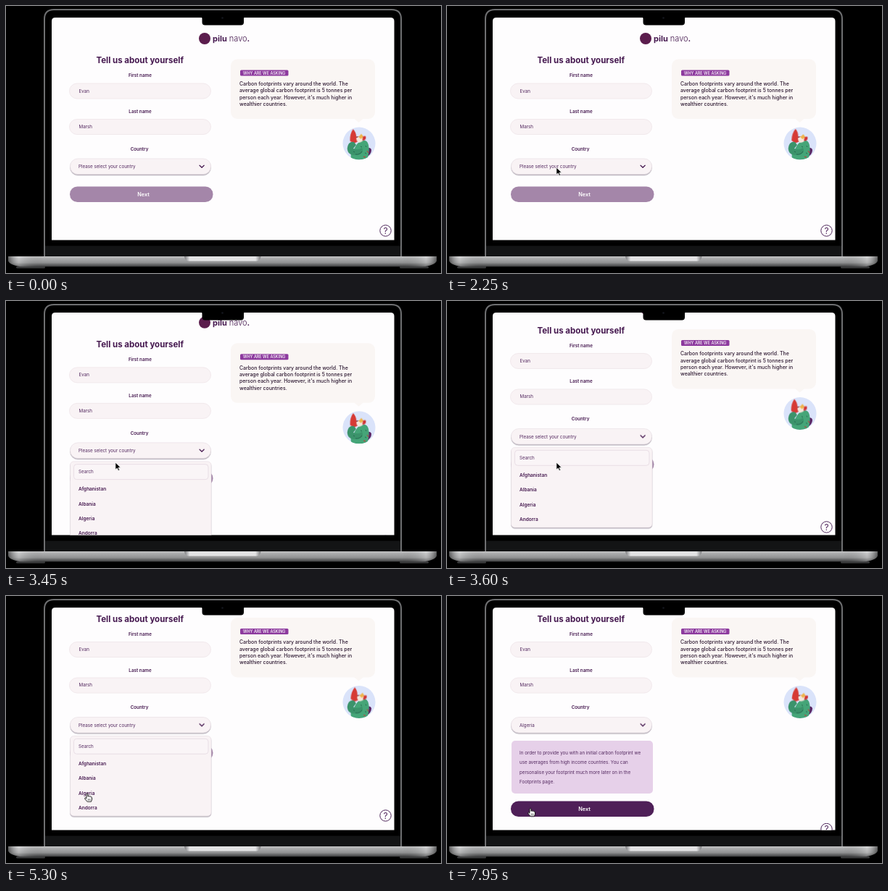
Animation, 600 px wide and 369 px high, one loop 8 s. Source, as an HTML page:

```html
<!DOCTYPE html>
<html lang="en">
<head>
<meta charset="utf-8">
<title>Tell us about yourself</title>
<style>
  html, body { margin: 0; width: 100%; height: 100%; overflow: hidden; background: #000; }
  svg { display: block; width: 100vw; height: 100vh; }
  text { font: 400 6.25px Inter, sans-serif; fill: #53285f; }
  .title { font-size: 11.5px; font-weight: 700; fill: #45184f; }
  .label { font-size: 6.3px; font-weight: 600; fill: #45184f; }
  .item { font-size: 6.5px; font-weight: 600; fill: #45184f; }
  .copy { font-size: 6.95px; font-weight: 500; fill: #29152e; }
  .tag { font-size: 5.5px; font-weight: 500; fill: #fff; }
  .next { font-size: 7.3px; font-weight: 600; fill: #fff; }
  .brand { font-size: 11px; font-weight: 300; fill: #45184f; }
  .brand tspan { font-weight: 700; }
  .mark { font-size: 12px; }
  .mid { text-anchor: middle; }
  .field { fill: #f9f3f5; stroke: #efe5e9; stroke-width: .8; }
  .raised { fill: #f9f3f5; stroke: #e6dce2; stroke-width: .6; filter: url(#drop); }

  .anim { animation: 8s linear infinite; }
  .page { animation-name: scroll; }
  .pointer { animation-name: move; }
  .head { animation: nod 1.6s ease-in-out infinite alternate; transform-origin: 485px 195px; }
  .step { animation: 8s step-end infinite; }
  .menu { animation-name: menu; }
  .before { animation-name: before; }
  .after { animation-name: after; }
  .help { animation-name: help; }
  .arrow { animation-name: arrow; }
  .hand { animation-name: hand; }

  @keyframes scroll {
    0%, 41.875% { transform: translateY(0); }
    43.125% { transform: translateY(-15px); }
    45% { transform: translateY(-34.5px); }
    47.5%, 100% { transform: translateY(-43.5px); }
  }
  @keyframes move {
    0%, 13.75% { transform: translate(160px, 376px); animation-timing-function: ease-out; }
    18.125%, 20% { transform: translate(157.5px, 288px); animation-timing-function: ease-in-out; }
    24.375%, 48.75% { transform: translate(150.8px, 223px); animation-timing-function: ease-in-out; }
    57.5%, 86.875% { transform: translate(111px, 272.2px); animation-timing-function: ease-in-out; }
    93.125%, 100% { transform: translate(114px, 292.5px); }
  }
  @keyframes nod { from { transform: rotate(-3deg); } to { transform: rotate(4deg); } }
  @keyframes menu { 0% { opacity: 0; } 30% { opacity: 1; } 73.75%, 100% { opacity: 0; } }
  @keyframes before { 0% { opacity: 1; } 73.75%, 100% { opacity: 0; } }
  @keyframes after { 0% { opacity: 0; } 73.75%, 100% { opacity: 1; } }
  /* The help button sits at the page bottom, so it follows the page height. */
  @keyframes help {
    0% { transform: none; }
    30% { transform: translateY(36.5px); }
    73.75%, 100% { transform: translateY(55px); }
  }
  @keyframes arrow {
    0% { opacity: 1; } 53.75% { opacity: 0; } 73.75% { opacity: 1; } 90.625%, 100% { opacity: 0; }
  }
  @keyframes hand {
    0% { opacity: 0; } 53.75% { opacity: 1; } 73.75% { opacity: 0; } 90.625%, 100% { opacity: 1; }
  }
</style>
</head>
<body>
<svg viewBox="0 0 600 369">
  <defs>
    <clipPath id="screen"><path d="M63 323.5V21q0-5 5-5H530.5q5 0 5 5V323.5Z"/></clipPath>
    <clipPath id="portrait"><circle cx="487" cy="190" r="22.5"/></clipPath>
    <linearGradient id="metal" x2="0" y2="1">
      <stop offset="0" stop-color="#d0d0d1"/>
      <stop offset=".2" stop-color="#b4b5b6"/>
      <stop offset=".6" stop-color="#999a9b"/>
      <stop offset="1" stop-color="#3c3d3e"/>
    </linearGradient>
    <linearGradient id="edges">
      <stop offset="0" stop-color="#000" stop-opacity=".5"/>
      <stop offset=".025" stop-color="#fff" stop-opacity=".25"/>
      <stop offset=".08" stop-color="#000" stop-opacity=".05"/>
      <stop offset=".92" stop-color="#000" stop-opacity=".05"/>
      <stop offset=".975" stop-color="#fff" stop-opacity=".25"/>
      <stop offset="1" stop-color="#000" stop-opacity=".5"/>
    </linearGradient>
    <linearGradient id="lip">
      <stop offset="0" stop-color="#77787a"/>
      <stop offset=".07" stop-color="#e2e2e3"/>
      <stop offset=".93" stop-color="#e2e2e3"/>
      <stop offset="1" stop-color="#77787a"/>
    </linearGradient>
    <filter id="drop" x="-5%" y="-10%" width="110%" height="130%">
      <feDropShadow dx="0" dy="1.3" stdDeviation=".6" flood-color="#7d6f82" flood-opacity=".6"/>
    </filter>
    <path id="base" d="M3 346H594V352q-3 7-20 8.300H23Q6 359 3 352Z"/>
    <rect id="foot" y="359.5" width="40" height="3" rx="1.5" fill="#3a3b3c"/>
  </defs>

  <rect width="600" height="369"/>

  <!-- Lid -->
  <path d="M53 346V18q0-13 13-13H532q13 0 13 13V346Z" stroke="#6e6f71" stroke-width="2"/>
  <path d="M54 331.500H544V346H54Z" fill="#131415"/>

  <g clip-path="url(#screen)">
    <rect x="63" y="16" width="473" height="308" fill="#fefdfe"/>

    <g class="page anim">
      <circle cx="274" cy="45" r="8" fill="#5b1d4d"/>
      <text class="brand" x="285" y="49"><tspan>pilu</tspan> navo<tspan>.</tspan></text>

      <text class="title mid" x="184.7" y="79.3">Tell us about yourself</text>
      <text class="label mid" x="185" y="98.2">First name</text>
      <rect class="field" x="87.5" y="107" width="195" height="21" rx="10.5"/>
      <text x="100.5" y="119.5">Evan</text>
      <text class="label mid" x="185" y="148">Last name</text>
      <rect class="field" x="87.5" y="156.5" width="195" height="21" rx="10.5"/>
      <text x="100.5" y="168.8">Marsh</text>
      <text class="label mid" x="184" y="199.7">Country</text>

      <g class="before step">
        <rect x="88" y="249.5" width="197.500" height="21.5" rx="10.5" fill="#a486a9"/>
        <text class="next mid" x="189.5" y="262.9">Next</text>
      </g>

      <g class="after step">
        <rect x="89" y="243.5" width="195" height="73" rx="5" fill="#e6d0e9"/>
        <text x="100" y="262.5">In order to provide you with an initial carbon footprint we</text>
        <text x="100" y="275.9">use averages from high income countries. You can</text>
        <text x="100" y="289.2">personalise your footprint much more later on in the</text>
        <text x="100" y="302.6">Footprints page.</text>
        <rect x="88" y="327" width="197.5" height="21.5" rx="10.5" fill="#4f2058"/>
        <text class="next mid" x="189.5" y="340.4">Next</text>
      </g>

      <rect class="raised" x="88.5" y="211" width="194" height="21.5" rx="10.5"/>
      <text class="before step" x="100" y="224.3">Please select your country</text>
      <text class="after step" x="100" y="224.3">Algeria</text>
      <path d="M267 220.300l3.100 3 3.100-3" fill="none" stroke="#45184f" stroke-width="1.25" stroke-linecap="round" stroke-linejoin="round"/>

      <g class="help step">
        <circle cx="523.5" cy="310.5" r="7.7" fill="#fff" stroke="#4b2358"/>
        <text class="mark mid" x="523.5" y="314.8">?</text>
      </g>

      <g class="menu step">
        <rect class="raised" x="88.5" y="237" width="194.5" height="110.5" rx="5"/>
        <rect x="93.5" y="240.8" width="185.5" height="21" rx="4" fill="#faf5f7" stroke="#e5d9e1" stroke-width=".8"/>
        <text x="100" y="253.5">Search</text>
        <text class="item" x="100" y="277.5">Afghanistan</text>
        <text class="item" x="100" y="297.8">Albania</text>
        <text class="item" x="100" y="318.1">Algeria</text>
        <text class="item" x="100" y="338.5">Andorra</text>
      </g>

      <rect x="310" y="73.5" width="199" height="82.5" rx="9" fill="#faf6f4"/>
      <path d="M480 155.500h13l-6.500 5.500Z" fill="#faf6f4"/>
      <rect x="323" y="88.5" width="66.5" height="8" rx="1.5" fill="#8d3a9e"/>
      <text class="tag mid" x="356.2" y="94.5">WHY ARE WE ASKING</text>
      <text class="copy" x="322" y="109.9">Carbon footprints vary around the world. The</text>
      <text class="copy" x="322" y="119.2">average global carbon footprint is 5 tonnes per</text>
      <text class="copy" x="322" y="128.5">person each year. However, it's much higher in</text>
      <text class="copy" x="322" y="137.8">wealthier countries.</text>

      <!-- Bird portrait -->
      <circle cx="487" cy="190" r="22.5" fill="#dae3fa"/>
      <g clip-path="url(#portrait)">
        <path d="M496 197q7-3 8 2 0 6-7 10Z" fill="#5a2463"/>
        <path d="M477 213q-4-9 3-15 4-9 10-12 8-2 10 6 2 9-2 20Z" fill="#45a578"/>
        <g class="head">
          <path d="M475 186q0-10 5-16 4 4 4 11l4-1-2 7-6 3Z" fill="#d63a35"/>
          <path d="M484 182q7-4 10 1 0 5-7 6-4-3-3-7Z" fill="#f4e6dc"/>
          <path d="M487 181l4-4 3 4-4 3Z" fill="#eeb34b"/>
          <path d="M493 181q5-2 4 2-1 4-5 3Z" fill="#cf3434"/>
          <circle cx="485" cy="181" r=".8" fill="#351c35"/>
        </g>
        <path d="M473 190q3-3 7-2l3 4-4 5q7 3 12-1 3 6-3 9-12 3-16-3-3-6 1-12Z" fill="#3b936b"/>
        <path d="M482 205q6 1 9-4M489 194l2 1M496 193l1 2M495 203l2 1M479 201l2 1" fill="none" stroke="#225d4a" stroke-width=".8"/>
        <path d="M498 200l2 3M493 208l3 1" stroke="#cf3434"/>
      </g>
    </g>
  </g>

  <!-- Notch and base -->
  <path d="M269 15.500H329q-1 0-1 2V22.500q0 4-4 4H274.500q-4 0-4-4V17.500q0-2-1.500-2Z"/>
  <circle cx="298.5" cy="16.5" r="1.3" fill="#15171f"/>
  <use href="#foot" x="14"/>
  <use href="#foot" x="543"/>
  <use href="#base" fill="url(#metal)"/>
  <use href="#base" fill="url(#edges)"/>
  <path d="M246 346H351.500q-1 6.500-6 6.500H252q-5 0-6-6.500Z" fill="url(#lip)"/>

  <g class="pointer anim">
    <path class="arrow step" d="M0 0V10.200L2.400 8 4 11.600 5.800 10.800 4.200 7.300H7.400Z" fill="#000" stroke="#fff" stroke-width=".8"/>
    <g class="hand step" stroke="#000" stroke-width=".9" stroke-linejoin="round">
      <path d="M0 7V2.200q0-1.200 1-1.200t1 1.200V5q.2-.8 1.100-.8T4.200 5.200q.2-.7 1-.6t.9 1q1.300-.5 1.400 1V9.200L6.400 12H1.200L-2.200 8.100q-.5-1.500 .8-1.500L0 7.600Z" fill="#fff"/>
      <path d="M2.200 8.200v2M3.700 8.200v2M5.200 8.200v2" stroke-width=".6"/>
    </g>
  </g>
</svg>
</body>
</html>
```
